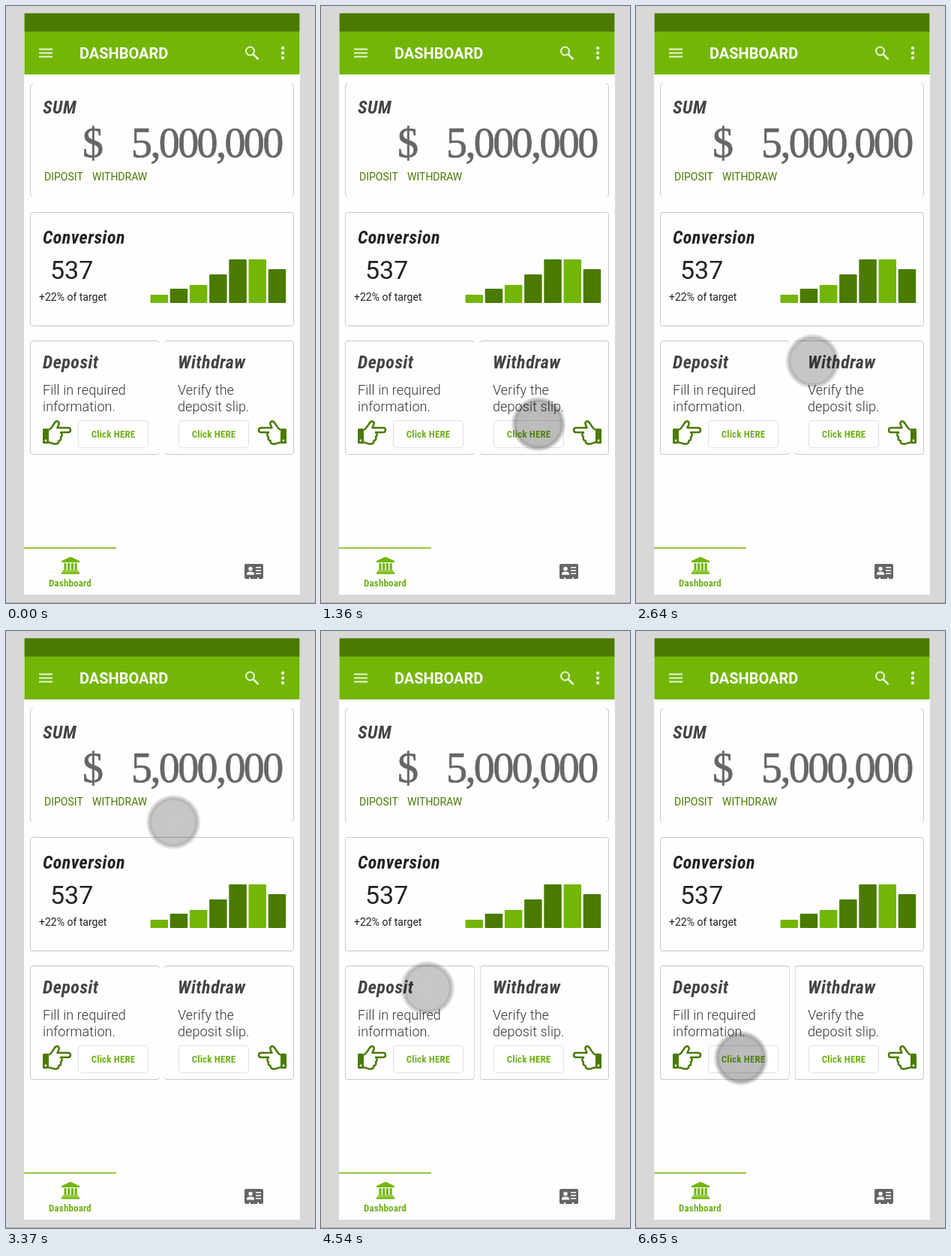
An HTML page that plays this animation: 412 by 794 pixels, repeating every 8 s.

```html
<!DOCTYPE html>
<html lang="en">
<head>
<meta charset="utf-8">
<title>Dashboard</title>
<style>
html, body { margin: 0; width: 100%; height: 100%; overflow: hidden; background: #d8d8d8; }
svg { display: block; width: 412px; height: 794px; font-family: Roboto, sans-serif; }
.light { fill: #73b605; }
.dark { fill: #4a7a00; }
.head { font: italic 700 24px "Roboto Condensed", Roboto, sans-serif; font-stretch: 75%; fill: #444; letter-spacing: .5px; }
.small { font: 700 13px "Roboto Condensed", Roboto, sans-serif; font-stretch: 75%; fill: #6fb01a; letter-spacing: .15px; text-anchor: middle; }
.body { font-size: 18px; font-weight: 300; fill: #333; letter-spacing: .1px; }
.money { font: 56px "Liberation Serif", serif; fill: #666; stroke: #666; stroke-width: .7; }
.card { fill: none; stroke: #c8c8c8; }
.button { fill: #fff; stroke: #e0e0e0; }
</style>
</head>
<body>
<svg viewBox="0 0 412 794">
  <defs>
    <radialGradient id="touch">
      <stop offset="0" stop-opacity=".5"/>
      <stop offset=".76" stop-opacity=".52"/>
      <stop offset=".83" stop-opacity=".68"/>
      <stop offset=".88" stop-opacity=".48"/>
      <stop offset="1" stop-opacity="0"/>
    </radialGradient>
    <g id="hand">
      <rect class="dark" x="49" y="562" width="8" height="20" rx="1.5"/>
      <circle cx="53" cy="578" r="1.4" fill="#fff"/>
      <path d="M57 563.5C61 562.5 63 556 66 553C69 551 72 554 70 557.5L68.5 561H83C87 561 87 567 83 567H73C75.5 569 75 572.5 73 573C74 576 73 578 70.5 578C70.5 581 69 582.5 66 582.5C62 582.5 60 580.5 57 580.5"
        fill="none" stroke="#4a7a00" stroke-width="2.5" stroke-linejoin="round"/>
    </g>
    <g id="action">
      <rect class="button" x="-46.5" y="551.5" width="93" height="36" rx="4"/>
      <text class="small" y="574">Click HERE</text>
    </g>
    <path id="half" d="M201 445.5H36Q32.5 445.5 32.5 449V593Q32.5 596.5 36 596.5H201Q204 596.5 204 594M204 448Q204 445.5 201 445.5"/>
    <path id="edge" d="M36 103.500Q32.500 103.500 32.500 107V250Q32.500 253 35 253.500"/>
  </defs>

  <path d="M0 793.5H412" stroke="#b4b4b4"/>
  <rect x="24" y="9" width="368" height="774" fill="#fefefe"/>
  <rect class="dark" x="24.5" y="9.5" width="367" height="25"/>
  <rect class="light" x="24.5" y="34" width="367" height="57"/>
  <g stroke="#eaf5d9" stroke-width="2" fill="none">
    <path d="M44 57.5h18m-18 5h18m-18 5h18"/>
    <circle cx="325.5" cy="60" r="5.5"/>
    <path d="M329.5 64l7 7" stroke-width="2.6"/>
    <path d="M369 56v.01m0 6.500v.01m0 6.500v.01" stroke-width="4.4" stroke-linecap="round"/>
  </g>
  <text x="98" y="70" font-size="20" font-weight="600" fill="#fff">DASHBOARD</text>

  <g class="card">
    <use href="#edge"/>
    <use href="#edge" transform="matrix(-1 0 0 1 416 0)"/>
    <rect x="32.5" y="274.5" width="351" height="151" rx="3"/>
    <use href="#half"/>
    <use href="#half" transform="matrix(-1 0 0 1 416 0)"/>
    <path id="sides" d="M204.5 448V594M212.5 448V594" stroke="#dcdcdc"/>
  </g>

  <text class="head" x="49" y="143">SUM</text>
  <text class="money" x="102" y="201">$</text>
  <text class="money" x="167" y="201" letter-spacing="-2.6">5,000,000</text>
  <g class="dark" font-size="14">
    <text x="51" y="232">DIPOSIT</text>
    <text x="115" y="232">WITHDRAW</text>
  </g>

  <text class="head" x="49" y="316" style="fill:#222">Conversion</text>
  <text x="59" y="363" font-size="34" fill="#222">537</text>
  <text x="44" y="392" font-size="14" fill="#222">+22% of target</text>
  <g id="bars"></g>

  <text class="head" x="49" y="482">Deposit</text>
  <text class="body" x="49" y="517">Fill in required</text>
  <text class="body" x="49" y="539">information.</text>
  <text class="head" x="229" y="482">Withdraw</text>
  <text class="body" x="229" y="517">Verify the</text>
  <text class="body" x="229" y="539">deposit slip.</text>
  <use href="#action" x="143"/>
  <use href="#action" x="277"/>
  <use href="#hand"/>
  <use href="#hand" transform="matrix(-1 0 0 1 423 0)"/>

  <rect class="light" x="24" y="720" width="123" height="1.5"/>
  <path class="light" d="M86 732.5l12 5.500v2H74v-2zM74 753h24v2.5H74zM75.500 750.500h21v2h-21z"/>
  <path d="M79 741v9m4.700 0v-9m4.700 0v9m4.700 0v-9" stroke="#73b605" stroke-width="3.2"/>
  <text class="small" x="85.5" y="772">Dashboard</text>
  <rect x="318" y="742" width="25" height="20" rx="2" fill="#666"/>
  <g fill="#fff">
    <circle cx="326" cy="748.5" r="2.7"/>
    <path d="M321 756.5q0-4 3-4h4q3 0 3 4zM324 760h2v2h-2zM335 760h2v2h-2z"/>
    <path d="M333 746.7h7m-7 4h7m-7 4h7" stroke="#fff" stroke-width="1.5"/>
  </g>

  <circle id="finger" r="37" fill="url(#touch)"/>
  <g id="arrow">
    <path d="M.5.5V16.5L4.3 13L7 19L9.5 18L7 12H12Z" fill="#fff" stroke="#111"/>
    <circle cx="14" r="5.6" fill="#d8f0fb" stroke="#1f8fe6" stroke-width="3.6"/>
  </g>
</svg>
<script>
const el = id => document.getElementById(id);

el("bars").innerHTML = [11, 19, 24, 38, 58, 58, 45].map((h, i) => {
  const shade = i === 0 || i === 2 || i === 5 ? "light" : "dark";
  return `<rect class="${shade}" x="${192.5 + 26.2 * i}" y="${395 - h}" width="23.5" height="${h}" rx="1"/>`;
}).join("");

// Pointer moves: start, end, destination, optional bend of the curve
const moves = [
  [170, 750, [289, 541], [330, 580]],
  [1200, 1360, [290, 556]],
  [1670, 2010, [250, 714]],
  [2450, 2850, [219, 196]],
  [3220, 3550, [187, 486], [240, 202]],
  [3740, 3920, [178, 650], [242, 735]],
  [3920, 4540, [142, 475], [125, 430]],
  [4560, 4680, [126, 496]],
  [5020, 5510, [140, 568], [168, 532]]
];

function pointer(t) {
  let from = [373, 840];
  for (const [start, end, to, bend] of moves) {
    if (t < start) break;
    const u = Math.min(1, (t - start) / (end - start));
    const s = u * u * (3 - 2 * u);
    from = from.map((a, k) => {
      const c = bend ? bend[k] : (a + to[k]) / 2;
      return a * (1 - s) ** 2 + 2 * c * s * (1 - s) + to[k] * s * s;
    });
  }
  return from;
}

function draw(now) {
  const t = now % 8000, [x, y] = pointer(t);
  const isArrow = y > 700;
  const pressed = t > 6620 || (t > 1280 && t < 1670);
  for (const id of ["finger", "arrow"]) el(id).setAttribute("transform", `translate(${x} ${y})`);
  el("finger").setAttribute("opacity", isArrow ? 0 : pressed ? .52 : .43);
  el("arrow").setAttribute("opacity", isArrow ? 1 : 0);
  el("sides").setAttribute("opacity", t > 3800 ? 1 : 0);
  requestAnimationFrame(draw);
}
requestAnimationFrame(draw);
</script>
</body>
</html>
```
